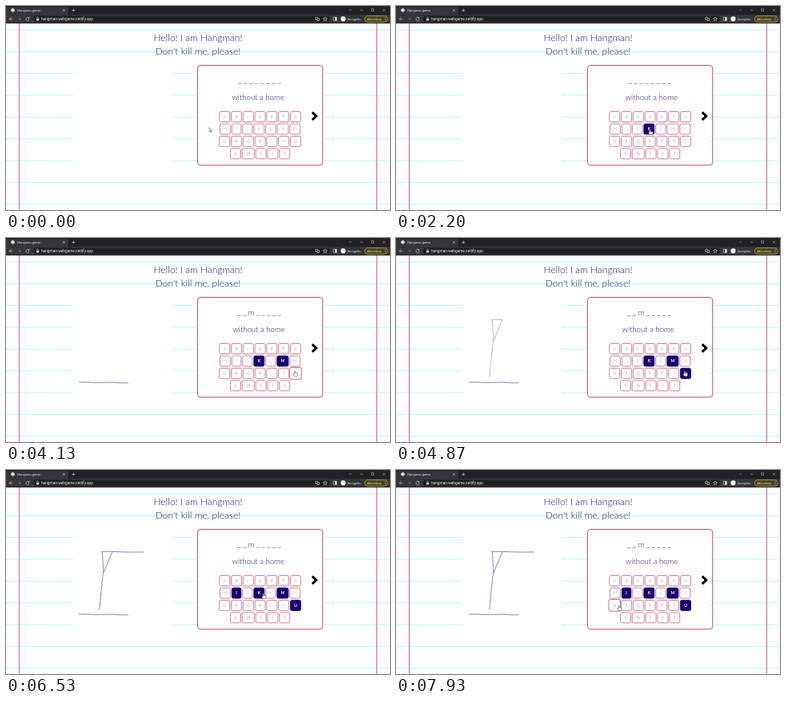
Recreate the animation shown at these times as an HTML page. Size 480x256 px, loop 8000 ms.

```html
<!DOCTYPE html>
<html lang="en">
<head>
<meta charset="utf-8">
<title>Hangman game</title>
<style>
html, body { margin: 0; width: 100%; height: 100%; overflow: hidden; background: #fff; }
svg { display: block; width: 100%; height: 100%; }
text { font-family: Lato, sans-serif; }
.bar text { font-family: Roboto, sans-serif; fill: #e8eaed; }
.note { font-weight: 300; fill: #15126e; text-anchor: middle; }
.icon { fill: none; stroke: #d5d7da; stroke-width: .6; }
.ink { fill: none; stroke: #4a4790; stroke-width: .65; stroke-linejoin: round; }
.key text { font-size: 5px; text-anchor: middle; }
</style>
</head>
<body>
<svg id="stage" viewBox="0 0 480 256">
  <rect width="480" height="256" fill="#fff"/>
  <g id="rules"></g>
  <path d="M16.5 22V256M463.5 22V256" stroke="#d66480"/>
  <rect x="83" y="75" width="125" height="125" fill="#fff"/>

  <g class="bar">
    <rect width="480" height="22" fill="#202124"/>
    <path d="M0 11V2Q0 1 2 1H75Q78 1 78 4V11H480V22H0Z" fill="#35363a"/>
    <rect x="34" y="12.3" width="371" height="8" rx="4" fill="#202124"/>
    <circle cx="8.5" cy="5.3" r="2.3" fill="#e0e2e5"/>
    <text x="14" y="6.8" font-size="4.1">Hangman game</text>
    <path class="icon" d="M71 4l2.8 2.8M73.8 4l-2.8 2.8M82.3 5.4h4M84.3 3.4v4M8.5 16.3H4.3M6.2 14.3l-2 2 2 2"/>
    <path class="icon" d="M429 4.4l1.4 1.5 1.4-1.5M442.8 5.2h3.4M456.8 3.6h2.8v2.8h-2.8z
      M471 3.8l3 3M474 3.8l-3 3" style="stroke:#b5b7ba"/>
    <path class="icon" d="M14.5 16.3h4.2M16.8 14.3l2 2-2 2" style="stroke:#85878b"/>
    <path class="icon" d="M28.6 15a2.1 2.1 0 1 0 .5 1.7M29 13.8v1.7h-1.7"/>
    <path d="M38 15.8h3.2v2.6H38z" fill="#c6c9cd"/>
    <path class="icon" d="M38.7 15.8v-.8a.9.9 0 0 1 1.8 0v.8"/>
    <text x="44" y="18" font-size="4.75">hangman-webgame.netlify.app</text>
    <path class="icon" d="M387 14.2h2.7v2.8H387zM389.7 15.4h1.8v3h-2.6v-1.4"/>
    <path class="icon" d="M399 13.7l.7 1.7 1.8.1-1.4 1.2.5 1.8-1.6-1-1.6 1 .5-1.8-1.4-1.2 1.8-.1z"/>
    <path class="icon" d="M409.2 14.2h4v4h-4z"/>
    <path d="M411.4 14h2v4.4h-2z" fill="#e8eaed"/>
    <circle cx="421.5" cy="16.2" r="3.1" fill="#f1f3f4"/>
    <text x="427" y="17.8" font-size="4">Incognito</text>
    <rect x="448.2" y="12.4" width="29" height="7.8" rx="3.9" fill="#484126" stroke="#d9b84a" stroke-width=".6"/>
    <text x="451.2" y="17.8" font-size="4.1" style="fill:#f6d568">Aktualizuj</text>
    <path d="M474 14.3v.8M474 16v.8M474 17.7v.8" stroke="#f6d568" stroke-width=".8"/>
  </g>

  <text class="note" x="240" y="44" font-size="12">Hello! I am Hangman!</text>
  <text class="note" x="240" y="61" font-size="12">Don't kill me, please!</text>

  <path class="ink" id="base" d="M91 181.2Q97 180.4 104 181.1T124 181.3T140 181.5T153 181.7"/>
  <path class="ink" id="pole" d="M116.8 175L119.4 148L121.8 126L120.4 103M119 102.4L133 102.3L122.2 128.5"/>
  <path class="ink" id="beam" d="M133 102.4Q152 103.4 172.5 103"/>

  <rect x="239.5" y="74.5" width="156.3" height="125.3" rx="3.5" fill="#fff" stroke="#bd4f70"/>
  <g id="word"></g>
  <text class="note" id="hint" y="118.3" font-size="9.6">without a home</text>
  <path d="M382.8 133.4L387.8 138.2L382.8 143" fill="none" stroke="#000" stroke-width="3"/>
  <g id="keys"></g>

  <g id="cursor" fill="#fff" stroke="#555" stroke-width=".6" stroke-linejoin="round">
    <path id="arrow" d="M0 0V5.2L1.2 4.2L2.1 6.1L3 5.7L2.1 3.8H3.7Z"/>
    <path id="hand" d="M-.6 .4Q0-.4 .6 .4V2.5L3.2 3Q3.8 3.2 3.7 4L3.1 6.4H-.2L-2 3.9Q-1.6 3.1-.6 3.9Z"/>
  </g>
</svg>
<script>
const LOOP = 8000;
const SWAY = 407;
const NAVY = '#17006e';
const RED = '#d0708b';
const $ = id => document.getElementById(id);

function add(parent, tag, attrs, label) {
  const node = document.createElementNS('http://www.w3.org/2000/svg', tag);
  for (const name in attrs) node.setAttribute(name, attrs[name]);
  if (label) node.textContent = label;
  parent.appendChild(node);
  return node;
}

const clamp = v => Math.max(0, Math.min(1, v));
const ease = v => v * v * (3 - 2 * v);

for (let i = 0; i < 9; i++) {
  const y = 30 + i * 27.35;
  add($('rules'), 'path', { d: `M0 ${y}H480`, stroke: '#b2fbfb' });
}

// Time at which each guessed letter is clicked
const clicks = { K: 2200, M: 3600, U: 4700, I: 5950 };

// Keys are as wide as their letter needs; each row is centred
const widths = { I: 11.5, J: 12.3, L: 12.3, M: 14, W: 15 };
const widthOf = letter => widths[letter] || 12.9;
const GAP = 1.9;

function makeRow(letters, row) {
  const y = 139 + row * 15.45;
  const all = [...letters];
  const total = all.reduce((sum, c) => sum + widthOf(c) + GAP, -GAP);
  let left = 317.6 - total / 2;
  return all.map(letter => {
    const w = widthOf(letter);
    const x = left + w / 2;
    left += w + GAP;
    const node = add($('keys'), 'g', { class: 'key' });
    const box = add(node, 'rect', {
      x: -w / 2, y: -6.5, width: w, height: 13, rx: 1.8, 'stroke-width': .9
    });
    const text = add(node, 'text', { y: 1.8 }, letter);
    return { letter, x, y, tint: row ? '#8f6a92' : '#3a9aa8', node, box, text };
  });
}

const keys = ['ABCDEFG', 'HIJKLMN', 'OPQRSTU', 'VWXYZ'].flatMap(makeRow);

const slots = Array.from({ length: 8 }, () =>
  add($('word'), 'text', { class: 'note', y: 96.2, 'font-size': 11 }, '_'));

// Pointer stops: time, x, y
const stops = [
  [0, 254, 152.5], [350, 255, 152.5], [900, 272, 143], [1350, 310, 143],
  [1700, 311, 144], [2000, 317, 155], [2450, 318, 155], [2800, 350, 156],
  [3050, 350, 156], [3270, 349, 164], [3480, 348, 156], [3700, 348, 156],
  [4050, 361, 167], [4850, 361, 167], [5200, 344, 168], [5560, 290.5, 154],
  [6100, 290.5, 154], [6500, 321.5, 155], [6600, 322, 155], [6900, 331, 184],
  [7150, 352, 184], [7300, 354, 173], [7800, 278.5, 170], [8000, 278.5, 170]
];

function pointer(t) {
  let i = 0;
  while (i < stops.length - 2 && t >= stops[i + 1][0]) i++;
  const [t0, x0, y0] = stops[i];
  const [t1, x1, y1] = stops[i + 1];
  const k = ease(clamp((t - t0) / (t1 - t0)));
  return [x0 + (x1 - x0) * k, y0 + (y1 - y0) * k];
}

const over = (key, [x, y]) => Math.abs(x - key.x) < 7.2 && Math.abs(y - key.y) < 7.2;

function drawKey(key, t, trail) {
  const used = t >= clicks[key.letter];
  const hover = used ? 0 : trail.filter(p => over(key, p)).length / trail.length;
  key.node.setAttribute('transform', `translate(${key.x} ${key.y}) scale(${1 + .13 * hover})`);
  key.box.setAttribute('fill', used ? NAVY : '#fff');
  key.box.setAttribute('stroke', used ? NAVY : RED);
  key.text.setAttribute('fill', used ? '#fff' : key.tint);
  key.text.setAttribute('font-weight', used ? 700 : 300);
}

function drawWord(found) {
  slots.forEach((slot, i) => {
    const isM = found && i === 2;
    const x = found ? 291.6 + i * 6.75 + (i === 2 ? 1.4 : i > 2 ? 2.9 : 0) : 292.4 + i * 7.05;
    slot.textContent = isM ? 'm' : '_';
    slot.setAttribute('x', x);
    slot.setAttribute('y', isM ? 97 : 96.2);
    slot.setAttribute('font-size', isM ? 9.6 : 11);
  });
}

function render(t) {
  const pos = pointer(t);
  const trail = Array.from({ length: 10 }, (_, i) => pointer(Math.max(0, t - i * 16)));
  keys.forEach(key => drawKey(key, t, trail));
  drawWord(t >= clicks.M);
  $('hint').setAttribute('x', 317.4 - 2.3 * Math.cos(2 * Math.PI * t / SWAY));

  const fade = (id, start) => $(id).setAttribute('opacity', clamp((t - start) / 280));
  fade('base', clicks.K);
  fade('pole', clicks.U);
  fade('beam', clicks.I);

  const onKey = keys.some(key => over(key, pos));
  $('cursor').setAttribute('transform', `translate(${pos[0]} ${pos[1]})`);
  $('arrow').setAttribute('visibility', onKey ? 'hidden' : 'visible');
  $('hand').setAttribute('visibility', onKey ? 'visible' : 'hidden');
}

const begin = performance.now();
function tick() {
  render((performance.now() - begin) % LOOP);
  requestAnimationFrame(tick);
}
tick();
</script>
</body>
</html>
```
